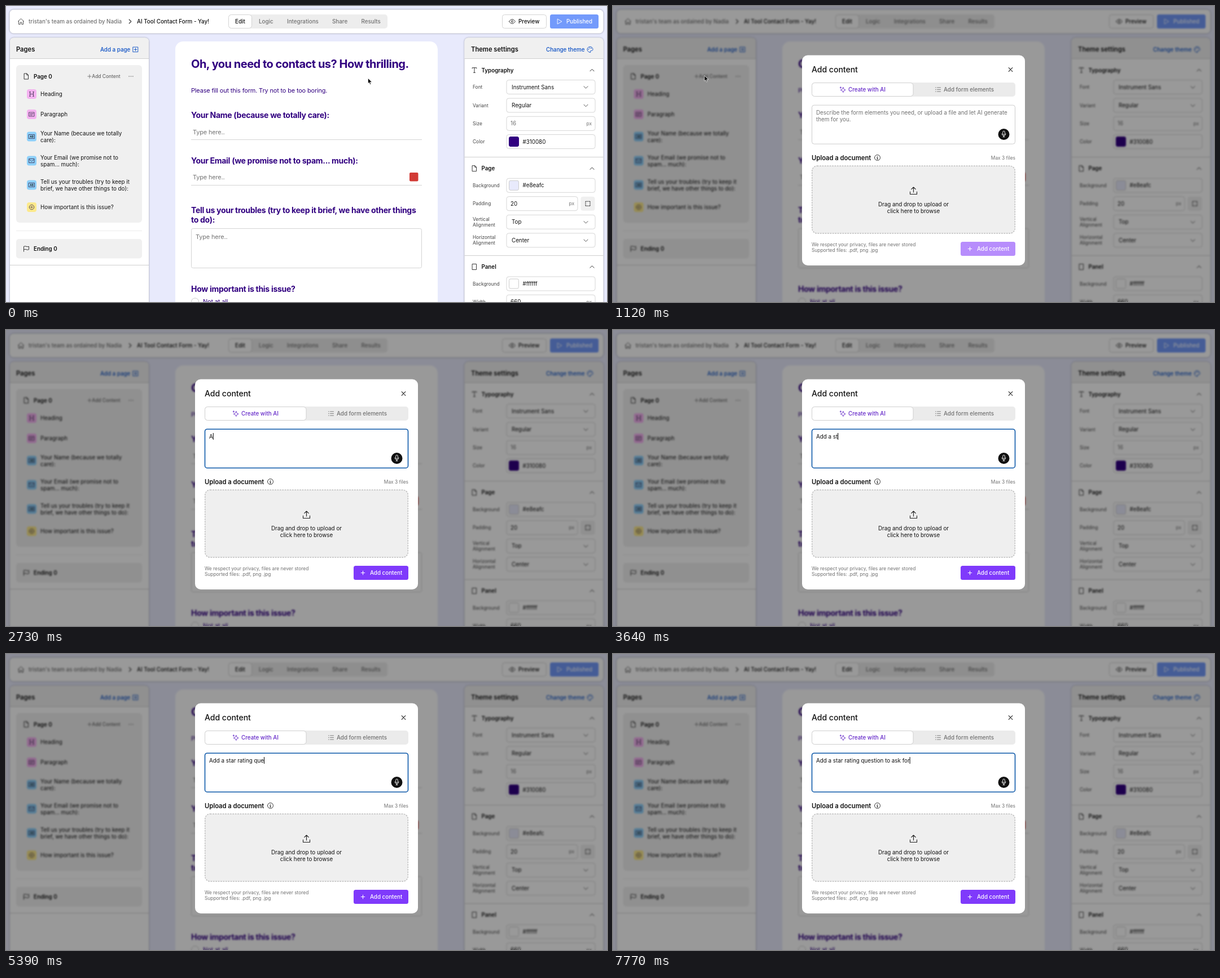
Animation, 1065 px wide and 526 px high, one loop 8000 ms. Source, as an HTML page:

```html
<!DOCTYPE html>
<html lang="en">
<head>
<meta charset="utf-8">
<title>Form builder</title>
<style>
html, body { margin: 0; width: 100%; height: 100%; overflow: hidden; background: #e8eafc; }
svg, #dim { position: absolute; left: 0; top: 0; width: 100%; height: 100%; display: block; }
#dim { background: rgba(0, 0, 0, .4); backdrop-filter: blur(1.4px); }
text { font: 400 9.8px Inter, sans-serif; fill: #111; }
.m { font-weight: 500; }
.b { font-weight: 600; }
.h { font-size: 11.2px; font-weight: 600; }
.s { font-size: 8.4px; }
.g { fill: #707070; }
.blue { fill: #0b4fc4; }
.mid { text-anchor: middle; }
.end { text-anchor: end; }
.form { font-size: 10.9px; letter-spacing: -.13px; fill: #310080; }
.label { font-size: 14px; font-weight: 700; letter-spacing: -.29px; fill: #310080; }
.title { font-size: 20px; font-weight: 700; letter-spacing: -.5px; fill: #310080; }
.hint { font-size: 10.9px; letter-spacing: -.13px; fill: #757575; }
.shadow { filter: drop-shadow(0 .7px 1.4px rgba(0, 0, 0, .38)); }
</style>
</head>
<body>
<svg id="page" viewBox="0 0 1065 526"></svg>
<div id="dim"></div>
<svg id="top" viewBox="0 0 1065 526"></svg>
<script>
const LOOP = 8000, STEP = 70;

const text = (x, y, s, cls = '', extra = '') => `<text x="${x}" y="${y}" class="${cls}" ${extra}>${s}</text>`;
const rect = (x, y, w, h, r, fill, stroke = 'none', extra = '') =>
  `<rect x="${x}" y="${y}" width="${w}" height="${h}" rx="${r}" fill="${fill}" stroke="${stroke}" ${extra}/>`;
const line = (x1, y, x2, color) => `<path d="M${x1} ${y}H${x2}" stroke="${color}"/>`;
const icon = (x, y, d, color = '#222', w = .9, fill = 'none') =>
  `<path transform="translate(${x} ${y})" d="${d}" fill="${fill}" stroke="${color}" stroke-width="${w}" stroke-linejoin="round" stroke-linecap="round"/>`;
const ring = (r, x = 0, y = 0) => `M${x - r} ${y}a${r} ${r} 0 1 0 ${2 * r} 0a${r} ${r} 0 1 0 ${-2 * r} 0`;

const ICON = {
  home: 'M-5-.3 0-5 5-.3M-4-1.2V5H-1.3V1.5H1.3V5H4V-1.2',
  doc: 'M-3.5-5H.8L3.5-2.3V5H-3.5ZM.8-5V-2.3H3.5',
  sheet: 'M-3.5-5H3.5V5H-3.5Z',
  flag: 'M-4.5 5V-4Q-2-5 0-4T4.5-4V1.5Q2 2.5 0 1.5T-4.5 1.5',
  plus: 'M-3.2 0H3.2M0-3.2V3.2',
  plusBox: 'M-4.3-4.3H4.3V4.3H-4.3ZM-2.3 0H2.3M0-2.3V2.3',
  down: 'M-3.5-1.8 0 1.8 3.5-1.8',
  up: 'M-3.5 1.8 0-1.8 3.5 1.8',
  right: 'M-1.8-3.5 1.8 0-1.8 3.5',
  eye: 'M-5.5 0Q0-8 5.5 0Q0 8-5.5 0Z' + ring(1.6),
  play: 'M-3-4.3 4.5 0-3 4.3Z',
  palette: 'M0 5A5 5 0 1 1 5 0C5 2 3.4 2 2 2S0 3 .8 3.8 .6 5 0 5Z' + ring(.4, -2.6, -.4) + ring(.4, -.8, -2.7) + ring(.4, 2, -2.2),
  type: 'M-3.8-3V-4.3H3.8V-3M0-4.3V4.3M-1.5 4.3H1.5',
  corners: 'M-4-2V-4H-2M2-4H4V-2M4 2V4H2M-2 4H-4V2M-.6-4H.6M-.6 4H.6M-4-.6V.6M4-.6V.6',
  heading: 'M-3-3.8V3.8M3-3.8V3.8M-3 0H3M-4-3.8H-2M2-3.8H4M-4 3.8H-2M2 3.8H4',
  para: 'M-4.5-3.5H4.5V3.5H-4.5ZM-2.8-1H2.8M-2.8 1.3H1',
  field: 'M-5-3.5H5V3.5H-5Z',
  mail: 'M-4.5-3.5H4.5V3.5H-4.5ZM-4-2 0 1 4-2',
  target: ring(4.2) + ring(1.4),
  close: 'M-3.3-3.3 3.3 3.3M3.3-3.3-3.3 3.3',
  spark: 'M.8-3.8Q1.4.2 5 .8Q1.4 1.4 .8 5Q.2 1.4-3.8.8Q.2.2 .8-3.8ZM-3.6-4.8V-2.2M-4.9-3.5H-2.3',
  list: 'M-1.5-3.5H4.5M-1.5 0H4.5M-1.5 3.5H4.5M-4.5-3.5h.8M-4.5 0h.8M-4.5 3.5h.8',
  info: ring(5) + 'M0-.6V2.5M-1-.6H0M-1 2.5H1M0-2.6V-2.4',
  upload: 'M0 2.5V-6.5M-3.8-2.8 0-6.5 3.8-2.8M-6 1.5V6H6V1.5',
  mic: 'M-1.8-3.4a1.8 1.8 0 0 1 3.6 0V-.2a1.8 1.8 0 0 1-3.6 0ZM-3.5-.5a3.5 3.5 0 0 0 7 0M0 3V5.2M-1.5 5.2H1.5',
  arrow: 'M0 0V9.3L2.1 7.4 3.6 11 5.2 10.3 3.7 6.9 6.7 6.7Z',
  beam: 'M-2-5.2Q0-5.2 0-4Q0-5.2 2-5.2M0-4V4M-2 5.2Q0 5.2 0 4Q0 5.2 2 5.2M-1 1.5H1'
};

function header() {
  const tabs = [['Logic', 448], ['Integrations', 498], ['Share', 578], ['Results', 629.5]];
  return rect(6.5, 6.5, 1052, 42, 7, '#fff', 'none', 'class="shadow"') +
    icon(26.5, 27.5, ICON.home, '#444') +
    text(40, 31, 'tristan\'s team as ordained by Nadia', 'm g') +
    icon(220, 27.5, ICON.right, '#333', 1.1) +
    text(232, 31, 'AI Tool Contact Form - Yay!', 'm') +
    rect(394, 15, 282, 25, 5, '#ededed') +
    rect(394.5, 15.5, 41, 24, 5, '#fff', '#d4d4d4') +
    text(406, 31, 'Edit', 'm') +
    tabs.map(([s, x]) => text(x, 31, s, 'm g')).join('') +
    rect(879.5, 15.5, 78, 24, 4, '#fff', '#d4d4d4') +
    icon(897, 27.5, ICON.eye) + text(908, 31, 'Preview', 'm') +
    rect(964, 15, 86, 25, 3.5, '#739afb') +
    icon(980.5, 27.5, ICON.play, '#fff') + text(993, 31, 'Published', 'm', 'style="fill:#fff"');
}

// Side panel with a grey title strip; runs off the bottom of the stage.
const panel = (x, w) => rect(x, 56.5, w, 490, 7, '#fff', 'none', 'class="shadow"') +
  `<path d="M${x} 93.5V63.5q0-7 7-7H${x + w - 7}q7 0 7 7V93.5Z" fill="#f0f0f0"/>` + line(x, 93.5, x + w, '#cfcfcf');

function leftPanel() {
  const pink = '#f4b1f0', blue = '#8ed0fa', yellow = '#fce98c';
  const items = [
    [156.5, pink, 'heading', 'Heading'],
    [192.5, pink, 'para', 'Paragraph'],
    [232, blue, 'field', 'Your Name (because we totally|care):'],
    [275, blue, 'mail', 'Your Email (we promise not to|spam... much):'],
    [318, blue, 'field', 'Tell us your troubles (try to keep it|brief, we have other things to do):'],
    [357.5, yellow, 'target', 'How important is this issue?']
  ];
  const row = ([y, color, name, label]) => {
    const lines = label.split('|');
    return rect(37, y - 8.5, 17, 17, 4, color) + icon(45.5, y, ICON[name], '#33264a', .8) +
      (name === 'field' ? text(45.5, y + 1.8, 'AB', 'mid b', 'style="font-size:4.8px"') : '') +
      lines.map((s, i) => text(61, y + 3.6 + (i - (lines.length - 1) / 2) * 12, s)).join('');
  };
  return panel(7, 246) + text(18, 81, 'Pages', 'h') +
    text(167, 81, 'Add a page', 'm blue') + icon(229.5, 77.3, ICON.plusBox, '#0b4fc4') +
    rect(18, 105, 223, 280, 6, '#f0f0f0') +
    icon(36, 125, ICON.doc) + text(49, 128.6, 'Page 0', 'b') +
    rect(138, 117, 72, 16, 3, '#e2e2e2', 'none', 'id="hover"') +
    `<g id="add">${icon(148, 125, ICON.plus, 'currentColor', .8)}${text(152.3, 128.1, 'Add Content', 'm s', 'style="fill:currentColor"')}</g>` +
    [218.2, 221.5, 224.8].map(x => `<circle cx="${x}" cy="125" r=".75" fill="#555"/>`).join('') +
    items.map(row).join('') +
    line(18, 399.5, 241, '#ececec') +
    rect(18, 414, 223, 34.5, 5, '#f0f0f0') +
    icon(36, 431.3, ICON.flag) + text(49, 434.8, 'Ending 0', 'b') +
    line(7, 460.5, 253, '#cfcfcf') +
    rect(17.5, 104.8, 224.5, 280.5, 5, 'none', '#5a83f5', 'stroke-width="2.2" id="outline"');
}

function form() {
  return rect(300, 63, 465, 490, 14, '#fff') +
    text(328, 110, 'Oh, you need to contact us? How thrilling.', 'title') +
    text(328, 154, 'Please fill out this form. Try not to be too boring.', 'form') +
    text(328, 199, 'Your Name (because we totally care):', 'label') +
    text(331, 227.5, 'Type here..', 'hint') + line(328, 237.5, 737, '#d4d4d4') +
    text(328, 279.5, 'Your Email (we promise not to spam... much):', 'label') +
    text(331, 308, 'Type here..', 'hint') + line(328, 318.5, 737, '#d4d4d4') +
    rect(715, 296, 15.5, 15.5, 2, '#d23a35') +
    text(328, 367.5, 'Tell us your troubles (try to keep it brief, we have other things', 'label') +
    text(328, 384.5, 'to do):', 'label') +
    rect(328.5, 395.5, 408, 70, 3, '#fff', '#d4d4d4') +
    text(336, 414, 'Type here..', 'hint') +
    text(328, 507.5, 'How important is this issue?', 'label') +
    `<circle cx="335" cy="525.5" r="6.5" fill="#fff" stroke="#ccc"/>` +
    text(349, 528.5, 'Not at all', 'form');
}

function rightPanel() {
  const heads = [[114, 'type', 'Typography'], [288.7, 'doc', 'Page'], [463.5, 'sheet', 'Panel']];
  const rows = [
    [144, 'Font', 'Instrument Sans', 'select'],
    [176.5, 'Variant', 'Regular', 'select'],
    [208.8, 'Size', '16', 'px'],
    [241, 'Color', '#310080', 'swatch'],
    [318.8, 'Background', '#e8eafc', 'swatch'],
    [351.2, 'Padding', '20', 'px'],
    [383.8, 'Vertical|Alignment', 'Top', 'select'],
    [416.3, 'Horizontal|Alignment', 'Center', 'select'],
    [493.5, 'Background', '#ffffff', 'swatch'],
    [525.8, 'Width', '660', 'px']
  ];
  const row = ([y, label, value, kind]) => {
    const lines = label.split('|');
    const w = label === 'Padding' ? 126 : 157;
    const swatch = kind === 'swatch';
    return lines.map((s, i) => text(827, y + 3 + (i - (lines.length - 1) / 2) * 10.2, s, 's', 'style="fill:#444"')).join('') +
      rect(887, y - 12.5, w, 25, 4, '#fff', '#d6d6d6') +
      text(swatch ? 915.5 : 894 + (kind === 'select' ? 2 : 0), y + 3.6, value, label === 'Size' ? 'g' : '') +
      (swatch ? rect(891.5, y - 8.5, 17, 17, 2.5, value, value === '#310080' ? value : '#ccc') : '') +
      (kind === 'select' ? icon(1027.5, y + .5, ICON.down, '#555', 1) : '') +
      (kind === 'px' ? text(887 + w - 6, y + 3, 'px', 's g end') : '');
  };
  return panel(812.5, 246) + text(824, 81, 'Theme settings', 'h') +
    text(957, 81, 'Change theme', 'm blue') + icon(1035, 77.3, ICON.palette, '#0b4fc4') +
    heads.map(([y, name, s]) => icon(830, y, ICON[name]) + text(842.5, y + 3.6, s, 'b') + icon(1038.5, y, ICON.up, '#333', 1)).join('') +
    rows.map(row).join('') +
    rect(1018.5, 338.7, 25, 25, 4, '#f0f0f0') + icon(1031, 351.2, ICON.corners) +
    line(812.5, 268.5, 1058.5, '#cfcfcf') + line(812.5, 443.5, 1058.5, '#cfcfcf');
}

function dialog() {
  const purple = '#6326c8';
  return rect(335, 87.5, 395, 373.5, 10, '#fff') +
    text(352, 118, 'Add content', 'm', 'style="font-size:14px"') +
    icon(704.5, 113, ICON.close, '#222', 1.1) +
    rect(352, 136, 361, 25, 5, '#ebebeb') +
    rect(352.5, 136.5, 179.5, 24, 5, '#fff', '#cfcfcf') +
    icon(407, 148.5, ICON.spark, purple) +
    text(417, 152, 'Create with AI', 'm', `style="fill:${purple}"`) +
    icon(576, 148.5, ICON.list, '#707070') + text(586, 152, 'Add form elements', 'm g') +
    rect(352.5, 176.2, 360, 69, 4, '#fff', '#ccc', 'id="box"') +
    `<g id="hint">${text(360, 192.5, 'Describe the form elements you need, or upload a file and let AI generate', 'g')}` +
    `${text(360, 204.5, 'them for you.', 'g')}</g>` +
    text(360, 192.5, '', '', 'id="typed"') + rect(360, 183, 1, 12, 0, '#000', 'none', 'id="caret"') +
    `<circle cx="692.5" cy="228" r="10" fill="#111"/>` + icon(692.5, 227.4, ICON.mic, '#fff') +
    text(352, 273.5, 'Upload a document', 'h') + icon(468.5, 269.5, ICON.info) +
    text(713, 272.5, 'Max 3 files', 's g end') +
    rect(352.7, 284.2, 359.6, 119.8, 9, '#efefef', '#bdbdbd', 'stroke-width="1.4" stroke-dasharray="2.8 1.6"') +
    icon(532.5, 328.5, ICON.upload, '#222', 1.1) +
    text(532.5, 356.4, 'Drag and drop to upload or', 'mid') +
    text(532.5, 368.4, 'click here to browse', 'mid') +
    text(352, 427, 'We respect your privacy, files are never stored', 's g') +
    text(352, 437.2, 'Supported files: .pdf, png .jpg', 's g') +
    rect(616, 419, 97, 25, 3.5, '#b78dfc', 'none', 'id="submit"') +
    icon(632.5, 431.5, ICON.plus, '#fff', 1.1) +
    text(645, 435, 'Add content', 'm', 'style="fill:#fff"');
}

const $ = id => document.getElementById(id);
$('page').innerHTML = header() + leftPanel() + form() + rightPanel();
$('top').innerHTML = `<g id="dialog">${dialog()}</g><g id="arrow">${icon(0, 0, ICON.arrow, '#fff', .7, '#000')}</g>` +
  `<g id="beam">${icon(403.5, 201.5, ICON.beam, '#111', 1)}</g>`;

const PHRASE = 'Add a star rating question to ask for';
// Bursts of typing: first key, last key, number of keys.
const BURSTS = [[2730, 3640, 8], [3850, 3920, 2], [4270, 5180, 9], [5320, 5390, 2],
  [5600, 6090, 5], [6650, 7350, 8], [7630, 7770, 3]];
const keys = BURSTS.flatMap(([a, b, n]) => Array.from({ length: n }, (_, i) => a + (b - a) * i / (n - 1)));

const show = (id, on) => { $(id).style.display = on ? '' : 'none'; };
const mix = (a, b, p) => a + (b - a) * p;
const ease = (t, a, b) => {
  const p = Math.min(1, Math.max(0, (t - a) / (b - a)));
  return p * p * (3 - 2 * p);
};

function draw(now) {
  const t = Math.floor(now % LOOP / STEP) * STEP;
  const open = t >= 1120, focus = t >= 2450;
  const hover = t >= 560 && !open;

  show('dim', open);
  show('dialog', open);
  show('hover', hover);
  $('add').style.color = hover ? '#111' : '#666';
  show('outline', t >= 1750 && !focus);

  const go = ease(t, 0, 560), back = ease(t, 1960, 2240);
  const x = mix(mix(641.5, 162, go), 403, back);
  const y = mix(mix(128.5, 124, go) - 116 * go * (1 - go), 196, back);
  $('arrow').setAttribute('transform', `translate(${x} ${y})`);
  show('arrow', t < 2240 && (t < 1050 || open));
  show('beam', t >= 2240 && t < 2730);

  const count = keys.filter(k => k <= t).length;
  show('hint', !count);
  show('caret', focus);
  $('box').setAttribute('stroke', focus ? '#0b57a8' : '#ccc');
  $('box').setAttribute('stroke-width', focus ? 1.6 : 1);
  $('submit').setAttribute('fill', count ? '#7f3afb' : '#b78dfc');
  $('typed').textContent = PHRASE.slice(0, count).replace(/ /g, '\u00a0');
  $('caret').setAttribute('x', 360 + (count ? $('typed').getComputedTextLength() : 0));
}

const start = performance.now();
function tick() {
  draw(performance.now() - start);
  requestAnimationFrame(tick);
}
tick();
</script>
</body>
</html>
```
